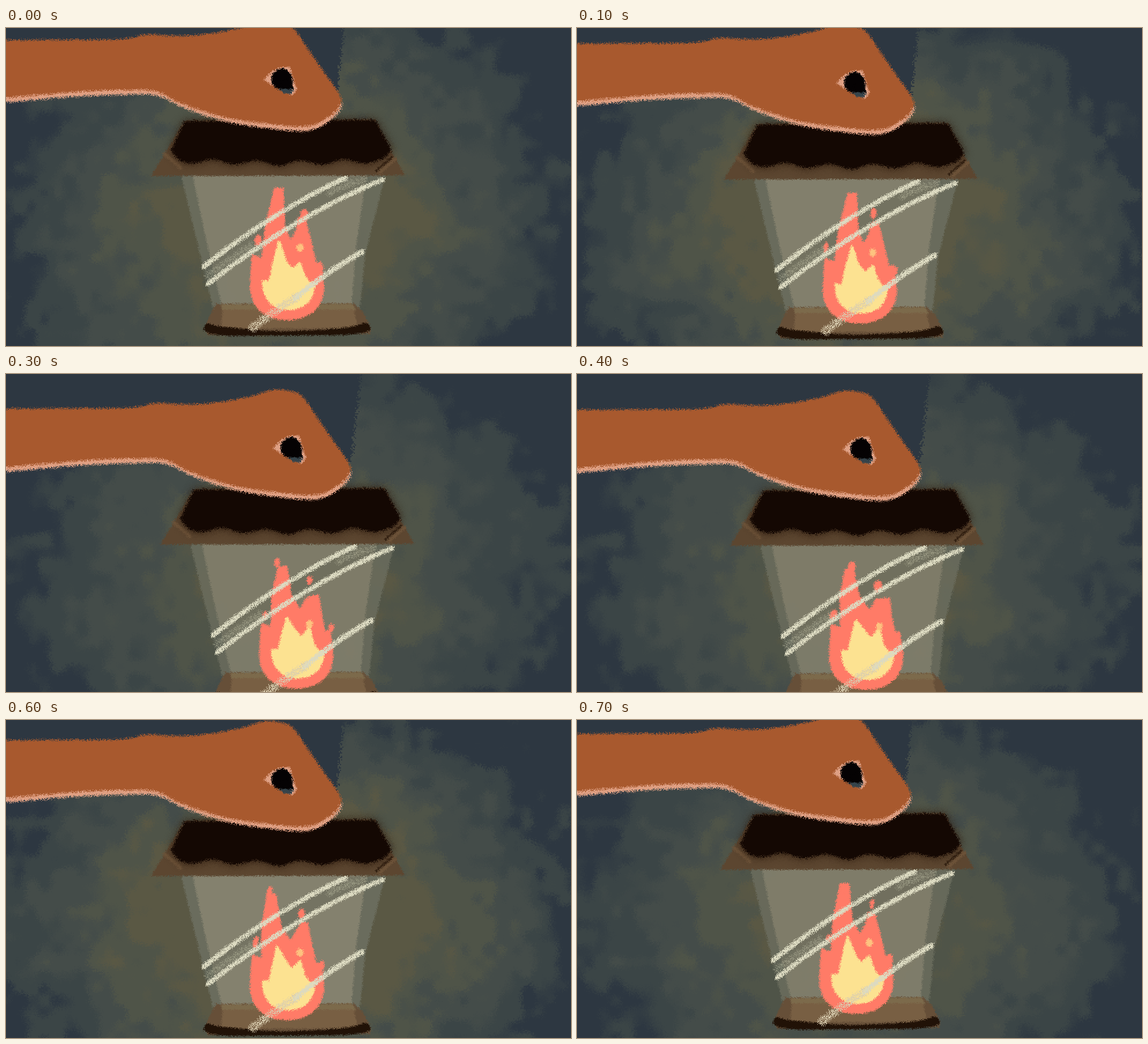
These frames come from a looping animation (978x550 px, 0.8 s). An HTML page with a canvas:

```html
<!DOCTYPE html>
<html>
<head>
<meta charset="utf-8">
<title>Hand and lantern</title>
<style>
html, body { margin: 0; width: 100%; height: 100%; overflow: hidden; background: #2d3741; }
canvas { display: block; }
</style>
</head>
<body>
<canvas id="stage" width="978" height="550"></canvas>
<script>
const W = 978, H = 550, PAD = 24, COUNT = 8, STEP = 100;

// Key poses of the swinging lantern and strength of its light
const swayX = [0, 3, 8, 16, 14, 8, 0, -3];
const swayY = [0, 6, 20, 39, 41, 32, 14, 3];
const light = [.95, 1, 1, .8, .8, .8, 1.08, .84];

let seed = 7;
function rand() {
  seed ^= seed << 13; seed ^= seed >>> 17; seed ^= seed << 5;
  return (seed >>> 0) / 4294967296;
}
function hash(x, y, s) {
  let h = Math.imul(x, 374761393) ^ Math.imul(y, 668265263) ^ Math.imul(s, 1274126177);
  h = Math.imul(h ^ h >>> 13, 1103515245);
  return ((h ^ h >>> 16) >>> 0) / 4294967296;
}
function noise(x, y, s) {
  const ix = Math.floor(x), iy = Math.floor(y);
  let u = x - ix, v = y - iy;
  u *= u * (3 - 2 * u);
  v *= v * (3 - 2 * v);
  const a = hash(ix, iy, s), b = hash(ix + 1, iy, s), c = hash(ix, iy + 1, s), d = hash(ix + 1, iy + 1, s);
  return a + (b - a) * u + (c - a + (a - b - c + d) * u) * v;
}
const clamp = (v, lo, hi) => Math.min(hi, Math.max(lo, v));

function makeCanvas(w, h) {
  const c = document.createElement('canvas');
  c.width = w; c.height = h;
  return c;
}

// Paints on a padded canvas, then scatters its pixels for a chalky edge
function layer(amp, holes, paint) {
  const w = W + 2 * PAD, h = H + 2 * PAD, c = makeCanvas(w, h), g = c.getContext('2d');
  g.translate(PAD, PAD);
  g.lineJoin = g.lineCap = 'round';
  paint(g);
  const img = g.getImageData(0, 0, w, h);
  const out = new Uint32Array(img.data.buffer), src = out.slice();
  const shift = () => Math.round((rand() - .5) * 2 * amp);
  for (let i = 0; i < out.length; i++) {
    out[i] = rand() < holes ? 0 : src[i + shift() * w + shift()] || 0;
  }
  g.putImageData(img, 0, 0);
  return c;
}

function poly(g, p, color) {
  g.beginPath();
  for (let i = 0; i < p.length; i += 2) g.lineTo(p[i], p[i + 1]);
  g.closePath();
  g.fillStyle = color;
  g.fill();
}

function blob(g, p, color) {
  const n = p.length, mid = i => [(p[i % n] + p[(i + 2) % n]) / 2, (p[(i + 1) % n] + p[(i + 3) % n]) / 2];
  g.beginPath();
  g.moveTo(...mid(n - 2));
  for (let i = 0; i < n; i += 2) g.quadraticCurveTo(p[i], p[i + 1], ...mid(i));
  g.fillStyle = color;
  g.fill();
}

function ellipse(g, x, y, rx, ry, color) {
  g.beginPath();
  g.ellipse(x, y, rx, ry, .15, 0, 7);
  g.fillStyle = color;
  g.fill();
}

function curve(g, x0, y0, cx, cy, x1, y1, width, color) {
  g.beginPath();
  g.moveTo(x0, y0);
  g.quadraticCurveTo(cx, cy, x1, y1);
  g.lineWidth = width;
  g.strokeStyle = color;
  g.stroke();
}

// Jagged top given by points, closed below by a round bowl
function tongues(g, p, bottom, color) {
  const n = p.length, x0 = p[0], x1 = p[n - 2], y0 = p[1], mx = (x0 + x1) / 2, r = (x1 - x0) * .3;
  g.beginPath();
  for (let i = 0; i < n; i += 2) g.lineTo(p[i], p[i + 1]);
  g.bezierCurveTo(x1, y0 + (bottom - y0) * .65, mx + r, bottom, mx, bottom);
  g.bezierCurveTo(mx - r, bottom, x0, y0 + (bottom - y0) * .65, x0, y0);
  g.fillStyle = g.strokeStyle = color;
  g.lineWidth = 4;
  g.fill();
  g.stroke();
}

// Flame licks sway with the swing; loose sparks jitter around it
function fire(n) {
  const a = 2 * Math.PI * n / COUNT, w = Math.cos(a), lean = 9 * Math.cos(a - .6), red = '#ff7b67';
  const tip = 465 + lean, top = 288 - 10 * w, side = 517 - 5 * w, sideTop = 338 - 10 * w;
  return layer(2, 0, g => {
    tongues(g, [424,445, 427,394, 444,400, 446 + lean / 2,345, tip - 7,top, tip + 6,top, 478 + lean / 2,345,
      493,370, 504,350, side - 5,sideTop, side + 4,sideTop, 529,378, 536,408, 544,406, 549,445], 503, red);
    [[460, 292], [511, 322], [545, 408], [434, 374]].forEach(([x, y], i) => {
      const j = k => hash(n, i, k) - .5;
      ellipse(g, x + 14 * j(1), y + 16 * j(2), 5.5 + 4 * j(3), 9 + 6 * j(4), red);
    });
    tongues(g, [445,438, 456,440, 463,408, 471 + lean / 4,378 - 8 * w, 484,404, 495,418, 509,403 + 4 * w,
      516,428, 524,440, 533,442], 486, '#fce291');
    ellipse(g, 509, 388 - 8 * w, 6, 7, '#fdc27f');
  });
}

const shades = [[45, 55, 65], [59, 69, 70], [68, 76, 73], [79, 84, 72], [90, 88, 68]];
function shade(v) {
  const t = clamp(v / .17, 0, 3.999), i = Math.floor(t), k = clamp((t - i - .5) * 2 + .5, 0, 1);
  return shades[i].map((c, j) => c + (shades[i + 1][j] - c) * k);
}

function backdrop(n) {
  const cx = 475 + swayX[n], cy = 330 + swayY[n] / 2, edge = 570 + swayX[n] * 1.8;
  const rx = 400 + 80 * light[n], tex = Math.ceil(n / 2.5);
  const c = makeCanvas(W / 2, H / 2), g = c.getContext('2d');
  const img = g.createImageData(c.width, c.height);
  for (let y = 0, i = 0; y < H; y += 2) {
    for (let x = 0; x < W; x += 2, i += 4) {
      const px = x + (rand() - .5) * 9, py = y + (rand() - .5) * 9;
      const d = Math.hypot((px - cx) / rx, (py - cy) / 390);
      const cloud = (noise(px / 60, py / 60, tex) + noise(px / 22, py / 22, tex + 9)) / 2 - .5;
      const hidden = y < 112 + swayY[n] && px < edge + 14 * (1 - y / 130);
      img.data.set(shade(hidden ? .03 : (1.07 - d + cloud * .4) * light[n]), i);
      img.data[i + 3] = 255;
    }
  }
  g.putImageData(img, 0, 0);
  return c;
}

const cream = '#dcdac1', haze = 'rgba(200,199,172,.4)';

const pane = layer(2, 0, g => {
  poly(g, [303,254, 657,254, 622,390, 612,490, 360,490, 339,405], '#6b6d5e');
  poly(g, [323,254, 624,254, 607,370, 597,490, 376,490, 346,365], '#868370');
  blob(g, [340,420, 340,420, 464,316, 588,254, 651,258, 500,330, 348,445, 348,445], 'rgba(90,94,80,.4)');
});

const base = layer(2, 0, g => {
  poly(g, [363,477, 602,476, 618,491, 632,520, 630,529, 348,531, 345,514], '#664f38');
  poly(g, [372,478, 601,477, 606,488, 374,488], '#7c6a4b');
  poly(g, [375,487, 602,487, 609,519, 372,520], '#785f43');
  blob(g, [344,508, 364,516, 480,527, 606,517, 626,506, 636,531, 480,532, 341,533], '#211207');
});

const chalk = layer(2, .12, g => {
  curve(g, 342,413, 464,316, 588,259, 8, cream);
  curve(g, 349,443, 500,325, 652,262, 8, cream);
  curve(g, 500,468, 560,418, 617,387, 9, cream);
});

const dust = layer(3, .45, g => {
  curve(g, 426,519, 460,493, 503,465, 13, '#d9cdb0');
  curve(g, 350,428, 385,402, 425,376, 12, haze);
  curve(g, 560,285, 590,270, 620,262, 11, haze);
});

const lid = layer(2, 0, g => {
  poly(g, [310,160, 639,158, 660,200, 691,255, 251,256, 278,211], '#5c4630');
  curve(g, 274,218, 288,228, 302,242, 6, '#6d5339');
  curve(g, 674,226, 658,238, 648,250, 6, '#6d5339');
  curve(g, 668,224, 654,236, 641,246, 4, '#342213');
});

const lidTop = layer(3, 0, g => {
  const p = [286,212, 309,161, 639,159, 668,212];
  for (let x = 652; x > 296; x -= 8) p.push(x, 234 + 4 * Math.sin(x / 12) - Math.abs(x - 474) / 40);
  g.shadowColor = '#2a180b';
  g.shadowBlur = 16;
  poly(g, p, '#140803');
});

// The lit rim is what the shifted shadow side leaves free
const hand = layer(3, 0, g => {
  const outline = [-90,21, 100,20, 215,20, 240,9, 290,15, 350,11, 408,0, 450,-14, 480,-10, 500,0, 545,70,
    580,116, 582,136, 570,155, 533,178, 500,179, 400,167, 350,154, 300,136, 264,114, 200,115, 100,119, -90,138];
  blob(g, outline, '#e0a083');
  g.globalCompositeOperation = 'source-atop';
  g.translate(-5, -8);
  blob(g, outline, '#a8592e');
  g.translate(5, 0);
  blob(g, outline, '#a8592e');
});

const grip = layer(2, 0, g => {
  poly(g, [446,90, 460,75, 478,67, 492,69, 498,91, 504,105, 497,116, 485,113, 459,98], '#dfa084');
  blob(g, [457,94, 470,78, 492,78, 499,107, 491,116, 475,109], '#35434a');
  ellipse(g, 477, 88, 18, 18, '#050203');
  poly(g, [474,92, 496,88, 497,106, 481,105], '#050203');
});

function drawing(n) {
  const c = makeCanvas(W, H), g = c.getContext('2d');
  g.imageSmoothingEnabled = false;
  g.drawImage(backdrop(n), 0, 0, W, H);
  g.translate(swayX[n] - PAD, swayY[n] - PAD);
  g.globalAlpha = .45 + light[n] * .48;
  g.drawImage(pane, 0, 0);
  g.globalAlpha = 1;
  for (const l of [base, fire(n), dust, chalk, lid, lidTop, hand, grip]) g.drawImage(l, 0, 0);
  return c;
}

const drawings = Array.from({ length: COUNT }, (_, n) => drawing(n));
const ctx = document.getElementById('stage').getContext('2d');
let start, shown;
function play(now) {
  start ??= now;
  const n = Math.floor((now - start) / STEP) % COUNT;
  if (n !== shown) ctx.drawImage(drawings[shown = n], 0, 0);
  requestAnimationFrame(play);
}
ctx.drawImage(drawings[0], 0, 0);
requestAnimationFrame(play);
</script>
</body>
</html>
```
